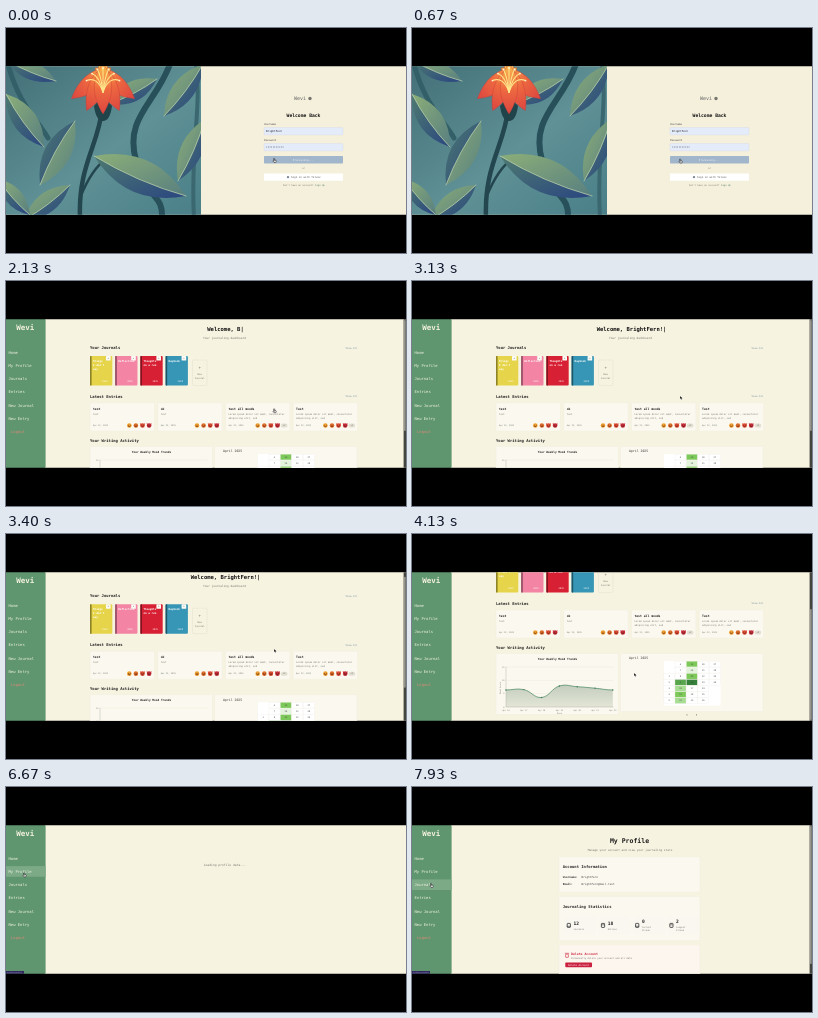
An HTML page for the animation above (8000 ms loop, 400 by 225 pixels).

```html
<!DOCTYPE html>
<html lang="en">
<head>
<meta charset="utf-8">
<title>Journal app tour</title>
<style>
  html, body { margin: 0; width: 100%; height: 100%; overflow: hidden; background: #000; }
  svg { display: block; width: 100%; height: 100%; }
  text { font-family: "DejaVu Sans Mono", "Noto Sans Mono", monospace; text-rendering: geometricPrecision; white-space: pre; }
</style>
</head>
<body>
<svg id="stage" viewBox="0 0 400 225">
  <defs>
    <clipPath id="view"><rect y="38.3" width="400" height="148.4"/></clipPath>
    <clipPath id="art"><rect y="38" width="195" height="149"/></clipPath>
    <linearGradient id="teal" x1="0" y1="0" x2="1" y2="1">
      <stop offset="0" stop-color="#447078"/><stop offset=".55" stop-color="#5f9196"/><stop offset="1" stop-color="#4a7f88"/>
    </linearGradient>
    <linearGradient id="leafDark" x1="0" y1="0" x2="1" y2="1">
      <stop offset="0" stop-color="#4d7a70"/><stop offset="1" stop-color="#2b4680"/>
    </linearGradient>
    <linearGradient id="leafLight" x1="0" y1="0" x2="1" y2="1">
      <stop offset="0" stop-color="#8cae78"/><stop offset="1" stop-color="#587f80"/>
    </linearGradient>
    <linearGradient id="petal" x1="0" y1="0" x2="0" y2="1">
      <stop offset="0" stop-color="#fbc04f"/><stop offset=".5" stop-color="#ee6a40"/><stop offset="1" stop-color="#dc4540"/>
    </linearGradient>
    <linearGradient id="area" x1="0" y1="0" x2="0" y2="1">
      <stop offset="0" stop-color="#c4cebe"/><stop offset="1" stop-color="#e3e5d6"/>
    </linearGradient>
  </defs>
</svg>
<script>
const LOOP = 8000;
const INK = '#222', GREY = '#77766e', CREAM = '#f7f3e1', GREEN = '#5f966f';
const APP = 'Wevi', USER = 'BrightFern';
const NS = 'http://www.w3.org/2000/svg';
const stage = document.getElementById('stage');

function el(parent, tag, attrs) {
  const node = document.createElementNS(NS, tag);
  for (const k in attrs) node.setAttribute(k, attrs[k]);
  return parent.appendChild(node);
}
const group = (p, attrs) => el(p, 'g', attrs);
const box = (p, x, y, width, height, fill, more) => el(p, 'rect', { x, y, width, height, fill, ...more });
const dot = (p, cx, cy, r, fill) => el(p, 'circle', { cx, cy, r, fill });
const path = (p, d, fill, stroke = 'none', width = 1) =>
  el(p, 'path', { d, fill, stroke, 'stroke-width': width, 'stroke-linecap': 'round' });
// y is the middle of the line of text
function label(p, x, y, size, str, fill = INK, more) {
  const node = el(p, 'text', { x, y: y + size * 0.35, 'font-size': size, fill, ...more });
  node.textContent = str;
  return node;
}
const BOLD = { 'font-weight': 700 };
const MID = { 'text-anchor': 'middle' };
const card = (p, x, y, w, h, fill = '#fbf9ef') =>
  box(p, x, y, w, h, fill, { rx: 1, stroke: '#efebdb', 'stroke-width': 0.4 });
const show = (node, on) => node.setAttribute('visibility', on ? 'inherit' : 'hidden');

const screen = group(stage, { 'clip-path': 'url(#view)' });

// Login
function leaf(p, x1, y1, x2, y2, bulge) {
  const mx = (x1 + x2) / 2, my = (y1 + y2) / 2, len = Math.hypot(x2 - x1, y2 - y1);
  const nx = (y1 - y2) / len * bulge, ny = (x2 - x1) / len * bulge;
  const vein = `Q${mx + nx * 0.2} ${my + ny * 0.2} ${x1} ${y1}`;
  for (const [s, fill] of [[1, 'url(#leafDark)'], [-1, 'url(#leafLight)']])
    path(p, `M${x1} ${y1}Q${mx + nx * s} ${my + ny * s} ${x2} ${y2}${vein}`, fill);
  path(p, `M${x2} ${y2}${vein}`, 'none', '#c3d6b0', 0.7);
}

function buildArt(p) {
  const art = group(p, { 'clip-path': 'url(#art)' });
  box(art, 0, 38, 195, 149, 'url(#teal)');
  const stem = (d, w, color = '#24474f') => path(art, d, 'none', color, w);
  stem('M164 36C150 75 118 90 130 132S157 165 156 190', 6, '#27505a');
  stem('M2 36C12 75 30 90 42 110', 5, '#335f68');
  stem('M190 36C196 80 184 120 188 190', 4, '#3a6770');
  stem('M96 82C92 118 72 138 74 190', 4.5);
  stem('M74 170C82 150 90 138 103 128', 2.5);
  leaf(art, 0, 32, 50, 53, 18);
  leaf(art, 0, 66, 38, 119, 24);
  leaf(art, 69, 93, 34, 157, 26);
  leaf(art, 103, 76, 151, 51, 20);
  leaf(art, 88, 128, 180, 168, 34);
  leaf(art, 158, 88, 197, 36, 22);
  leaf(art, 172, 153, 199, 91, 22);
  leaf(art, 18, 192, 64, 157, 20);
  leaf(art, -8, 151, 24, 187, 17);
  path(art, 'M88 78Q90 93 97 93T106 78L97 68Z', '#21434a');
  for (const a of [-52, 52, -24, 24, 0])
    el(art, 'path', {
      d: 'M97 36C84 52 87 70 97 86C107 70 110 52 97 36', fill: 'url(#petal)',
      stroke: '#c93b38', 'stroke-width': 0.4, transform: `rotate(${a} 97 46)`
    });
  for (let i = -3; i <= 3; i++) {
    const x = 97 + i * 5.5, y = 40 + i * i * 1.4;
    path(art, `M97 64Q${97 + i * 2} 48 ${x} ${y}`, 'none', '#ffe68a', 1.1);
    dot(art, x, y, 0.9, '#fff3cd');
  }
}

function buildLogin(p) {
  box(p, 0, 38, 400, 149, '#f5f0dc');
  buildArt(p);
  label(p, 288, 70.5, 5, APP, '#666');
  dot(p, 304, 70.5, 1.7, '#77776f');
  label(p, 297.5, 87, 4.7, 'Welcome Back', '#111', { ...BOLD, ...MID });
  const field = (y, name, value) => {
    label(p, 258, y, 2.5, name, '#444');
    box(p, 258, y + 3.5, 79, 7.4, '#e4ebf9', { rx: 0.8, stroke: '#d6dae4', 'stroke-width': 0.4 });
    label(p, 260, y + 7.2, 2.7, value, '#222');
  };
  field(96, 'Username', USER);
  field(112, 'Password', '•'.repeat(11));
  box(p, 258, 128, 79, 7.5, '#a1b5cb', { rx: 0.8 });
  label(p, 297, 131.8, 2.6, 'Processing...', '#f4f6f8', MID);
  label(p, 297.5, 140.5, 2.4, 'or', GREY, MID);
  box(p, 258, 145.5, 79, 7.2, '#fff', { rx: 0.8 });
  dot(p, 282, 149.1, 1.2, '#7d8795');
  label(p, 285, 149.1, 2.6, 'Sign in with Tolvex', '#555');
  label(p, 277, 157.5, 2.3, "Don't have an account?", GREY);
  label(p, 309, 157.5, 2.3, 'Sign Up', '#4d7d69');
}

// Dashboard
const WELCOME = `Welcome, ${USER}!`;
const SCROLL = 46;
let welcome, calendar, pager, chart, page, thumb;

function heading(p, y, str) {
  label(p, 84, y, 3.87, str, '#1c1c1c', BOLD);
}

function scrollbar(p, y, height) {
  box(p, 397.6, 38, 2.4, 149, '#45453f');
  return box(p, 398, y, 1.7, height, '#96968f', { rx: 0.8 });
}

function buildJournals(p) {
  const books = [
    ['#e6d54b', '#8d8226', 'Things|I don\'t|say'],
    ['#f384a4', '#8f4a60', 'Reflection'],
    ['#d82034', '#7c1422', 'Thoughts|on a run'],
    ['#3796b5', '#1d5468', 'Daybook']
  ];
  books.forEach(([color, spine, title], i) => {
    const x = 84 + i * 25.2;
    box(p, x, 75, 22.3, 29.6, color, { rx: 1 });
    box(p, x, 75, 1.6, 29.6, spine, { rx: 0.6 });
    box(p, x + 16, 75, 4.6, 4.6, '#fbfaf4', { rx: 0.5 });
    dot(p, x + 18.3, 77.2, 0.5, '#999');
    title.split('|').forEach((line, n) => label(p, x + 3, 80 + n * 4, 2.7, line, '#fff', BOLD));
    label(p, x + 12, 99.8, 2.3, '2025', '#fff');
  });
  box(p, 186.5, 79, 14.5, 25.5, 'none', { rx: 1, stroke: '#cfccbd', 'stroke-width': 0.4, 'stroke-dasharray': '1 .7' });
  label(p, 193.7, 86.5, 4, '+', GREY, MID);
  label(p, 193.7, 93, 2.3, 'New', GREY, MID);
  label(p, 193.7, 97, 2.3, 'Journal', GREY, MID);
}

function mood(p, x, y, color, horn) {
  if (horn) path(p, `M${x - 2.4} ${y - 2.6}L${x - 0.4} ${y - 1}H${x + 0.6}L${x + 2.4} ${y - 2.6}L${x + 2} ${y}H${x - 2}Z`, color);
  dot(p, x, y, 2.3, color);
  for (const s of [-0.9, 0.9]) dot(p, x + s, y - 0.4, 0.45, '#4a1d12');
  path(p, `M${x - 0.9} ${y + 0.9}Q${x} ${y + 1.6} ${x + 0.9} ${y + 0.9}`, '#5a2012', '#5a2012', 0.5);
}

function buildEntries(p) {
  const lorem = 'Lorem ipsum dolor sit amet, consectetur|adipiscing elit, sed';
  [['test', 'test'], ['ok', 'test'], ['test all moods', lorem], ['Test', lorem]].forEach(([title, body], i) => {
    const x = 84 + i * 67.7, long = i > 1;
    card(p, x, 122, 64.5, 28);
    label(p, x + 3, 128, 3.1, title, '#1c1c1c', BOLD);
    body.split('|').forEach((line, n) => label(p, x + 3, 133.2 + n * 3.9, 2.4, line, GREY));
    label(p, x + 3, 144.6, 2.1, 'Apr 22, 2025', GREY);
    ['#f0a030', '#e0702c', '#dc4a32', '#c52c3a'].forEach((c, n) =>
      mood(p, x + (long ? 32.3 : 39.3) + n * 6.6, 144.5, c, n > 1));
    if (long) {
      box(p, x + 55.5, 142.5, 6.5, 4, '#e3e0d3', { rx: 1.5 });
      label(p, x + 58.7, 144.5, 2.3, '+2', GREY, MID);
    }
  });
}

function buildChart(p) {
  card(p, 84, 165.5, 122.5, 61);
  label(p, 145.5, 171.2, 2.85, 'Your Weekly Mood Trends', '#222', { ...BOLD, ...MID });
  chart = group(p);
  const step = 17.8, left = 94, base = 219;
  for (let i = 0; i < 4; i++) {
    const y = 179 + i * 13.3;
    path(chart, `M${left} ${y}H201`, 'none', '#e6e3d6', 0.35);
    label(chart, 92.5, y, 2, String(15 - i * 5), GREY, { 'text-anchor': 'end' });
  }
  const ys = [202, 201.6, 209.5, 198, 198.7, 200.2, 202];
  let line = `M${left} ${ys[0]}`;
  for (let i = 1; i < ys.length; i++) {
    const x = left + i * step, h = step * 0.42;
    const slope = k => k > 0 && k < 6 ? (ys[k + 1] - ys[k - 1]) * 0.2 : 0;
    line += `C${x - step + h} ${ys[i - 1] + slope(i - 1)} ${x - h} ${ys[i] - slope(i)} ${x} ${ys[i]}`;
  }
  path(chart, `${line}V${base}H${left}Z`, 'url(#area)');
  path(chart, line, 'none', '#4f8a68', 0.75);
  path(chart, `M${left} 179V${base}H201`, 'none', '#aaa99d', 0.4);
  ys.forEach((y, i) => {
    const x = left + i * step;
    dot(chart, x, y, 0.7, '#3f7c59');
    label(chart, x, 222.5, 2, `Apr ${16 + i}`, GREY, MID);
  });
  label(chart, 147.5, 225.4, 2, 'Date', GREY, MID);
  label(chart, 88, 200, 2, 'Mood Score', GREY, { ...MID, transform: 'rotate(-90 88 200)' });
}

function buildCalendar(p) {
  card(p, 208.5, 165.5, 142.5, 58);
  label(p, 217, 170.3, 3.2, 'April 2025', '#333');
  calendar = group(p);
  box(calendar, 252, 173, 56.5, 44.5, '#fff');
  const shade = { 13: '#7cc95a', 14: '#e4f4dc', 15: '#7cc95a', 16: '#35803a', 9: '#57a54c', 10: '#a6dd92', 11: '#7cc95a', 12: '#a6dd92' };
  for (let col = 0; col < 5; col++)
    for (let row = 0; row < 7; row++) {
      const day = col * 7 + row - 1, x = 251.6 + col * 11.4, y = 173.2 + row * 6.1;
      if (day < 1 || day > 30) continue;
      box(calendar, x, y, 11, 5.7, shade[day] || '#fff', { stroke: '#eeece4', 'stroke-width': 0.3 });
      label(calendar, x + 5.5, y + 2.9, 2.2, String(day), '#444', MID);
    }
  pager = group(p);
  label(pager, 275, 227, 4, '‹', INK, MID);
  label(pager, 284.5, 227, 4, '›', INK, MID);
}

function buildDashboard(p) {
  box(p, 39, 38, 361, 149, CREAM);
  page = group(p);
  welcome = label(page, 219.5, 48.3, 5.53, '', '#111', { ...BOLD, ...MID });
  label(page, 218.5, 57.2, 2.85, 'Your journaling dashboard', GREY, MID);
  heading(page, 67, 'Your Journals');
  heading(page, 115.5, 'Latest Entries');
  heading(page, 159.5, 'Your Writing Activity');
  for (const y of [67, 115.5]) label(page, 339.5, y, 2.5, 'View All', '#7a94a0');
  buildJournals(page);
  buildEntries(page);
  buildChart(page);
  buildCalendar(page);
  thumb = scrollbar(p, 39, 111);
}

// Profile
function buildProfile(p) {
  label(p, 217.5, 54, 6.5, 'My Profile', '#1c1c1c', { ...BOLD, ...MID });
  label(p, 218, 63.2, 2.82, 'Manage your account and view your journaling stats', GREY, MID);
  const title = (y, str) => label(p, 150.7, y, 3.87, str, '#222', BOLD);
  card(p, 147, 70, 141, 35);
  title(79.7, 'Account Information');
  [['Username:', USER], ['Email:', `${USER}@mail.test`]].forEach(([k, v], i) => {
    label(p, 150.7, 90 + i * 6.6, 2.75, k, '#333', BOLD);
    label(p, 169.5, 90 + i * 6.6, 2.75, v, '#444');
  });
  card(p, 147, 109.5, 141, 44);
  title(120, 'Journaling Statistics');
  [['12', 'Journals'], ['18', 'Entries'], ['0', 'Current|Streak'], ['2', 'Longest|Streak']].forEach(([n, name], i) => {
    const x = 156.7 + i * 34.2;
    box(p, x - 3.5, 129.5, 31, 18, '#f9f7f0', { rx: 1 });
    box(p, x - 1.5, 136.4, 3.2, 4, 'none', { rx: 0.5, stroke: '#333', 'stroke-width': 0.8 });
    path(p, i % 2 ? `M${x - 0.7} 137.8H${x + 0.9}` : `M${x - 1.4} 139.3H${x + 1.6}`, 'none', '#333', 0.6);
    label(p, x + 4.8, name.includes('|') ? 134.8 : 136.3, 4.6, n, '#222', BOLD);
    name.split('|').forEach((s, k, all) =>
      label(p, x + 4.8, (all.length > 1 ? 140.3 : 142) + k * 3.1, 2.2, s, GREY));
  });
  card(p, 147, 158, 141, 40, '#fcf6ef');
  box(p, 153.6, 167.2, 2.8, 3.2, 'none', { rx: 0.4, stroke: '#cf2a40', 'stroke-width': 0.6 });
  path(p, 'M153.2 166.3H156.8', 'none', '#cf2a40', 0.6);
  label(p, 159, 166.8, 3.2, 'Delete Account', '#cf2a40', BOLD);
  label(p, 159, 171.5, 2.3, 'Permanently delete your account and all data', GREY);
  box(p, 153.3, 175.4, 26.7, 4.8, '#cb2140', { rx: 0.8 });
  label(p, 166.6, 177.8, 2.5, 'Delete Account', '#fff', MID);
  scrollbar(p, 39, 138);
}

// Sidebar
const LINKS = ['Home', 'My Profile', 'Journals', 'Entries', 'New Journal', 'New Entry', 'Logout'];
const linkY = i => 71.2 + i * 13.25;
let hover, status, statusText;

function buildSidebar(p) {
  box(p, 0, 38, 39.6, 149, GREEN);
  hover = box(p, 0, 0, 39.6, 10.6, '#7caa87');
  label(p, 19.2, 46.8, 7.5, APP, '#f4f1df', { ...BOLD, ...MID });
  LINKS.forEach((name, i) => {
    const last = i === 6;
    label(p, last ? 5 : 2.5, linkY(i), 3.85, name, last ? '#d98a78' : '#f3f2e4');
  });
  status = group(p);
  box(status, 0, 184, 18, 3, '#30275c');
  statusText = label(status, 0.7, 185.5, 1.5, '', '#b9b4e6');
}

const login = group(screen), app = group(screen);
buildLogin(login);
const dash = group(app), profile = group(app), loading = group(app);
buildDashboard(dash);
for (const p of [profile, loading]) box(p, 39, 38, 361, 149, CREAM);
buildProfile(profile);
label(loading, 218.8, 77.6, 3.05, 'Loading profile data...', GREY, MID);
buildSidebar(app);

const arrow = path(screen, 'M0 0L0 3.3L.9 2.6L1.5 3.7L2.1 3.4L1.6 2.4L2.6 2.3Z', '#111', '#fff', 0.25);
const hand = path(screen, 'M0 -1.6Q.6 -1.9 .7 -1.1V0L2 .4Q2.4 .7 2.2 1.4L1.8 2.4H0L-1.1 .9Q-1 .2 0 .8Z', '#fff', '#111', 0.55);

// Motion
const T = { enter: 1000, data: 1400, type: 1250, key: 85, load: 6470, ready: 6930 };
// time, x, y of the pointer
const POINTER = [
  [0, 268, 132], [1200, 268, 133], [1900, 268, 133], [2700, 268, 115], [3600, 268, 115],
  [4050, 222, 139], [4500, 222, 139], [5200, 42, 124], [5600, 17, 100], [5870, 17, 100],
  [6200, 18, 87.5], [7900, 18, 87.5], [7925, 19, 98], [LOOP, 19, 98]
];
const ease = k => k * k * (3 - 2 * k);
const ramp = (t, a, b) => ease(Math.min(1, Math.max(0, (t - a) / (b - a))));

function pointerAt(t) {
  const i = POINTER.findIndex(k => t < k[0]);
  const [a, x1, y1] = POINTER[i - 1], [b, x2, y2] = POINTER[i];
  const k = ramp(t, a, b);
  return [x1 + (x2 - x1) * k, y1 + (y2 - y1) * k];
}

function draw(now) {
  const t = now % LOOP;
  const inApp = t >= T.enter, onProfile = t >= T.load;
  show(login, !inApp);
  show(app, inApp);
  show(dash, inApp && !onProfile);
  show(loading, onProfile && t < T.ready);
  show(profile, t >= T.ready);

  const typed = Math.max(0, Math.floor((t - T.type) / T.key));
  const blink = t > 3300 && t % 1000 > 500;
  welcome.textContent = WELCOME.slice(0, typed) + (blink ? ' ' : '|');
  const full = t >= T.data;
  show(chart, full);
  show(calendar, full);
  pager.setAttribute('transform', `translate(0 ${full ? 0 : -41})`);
  const s = ramp(t, 3300, 3800);
  page.setAttribute('transform', `translate(0 ${-SCROLL * s})`);
  thumb.setAttribute('y', 39 + 36 * s);

  const [x, y] = pointerAt(t);
  const link = inApp && x < 40 ? Math.round((y - linkY(0)) / 13.25) : -1;
  show(hover, link >= 0);
  show(status, link >= 0);
  if (link >= 0) {
    hover.setAttribute('y', linkY(link) - 5.3);
    statusText.textContent = 'localhost/' + LINKS[link].split(' ').pop().toLowerCase();
  }
  const pointing = link >= 0 || t < 2250;
  show(hand, pointing);
  show(arrow, !pointing);
  for (const c of [hand, arrow]) c.setAttribute('transform', `translate(${x} ${y})`);
}

const start = performance.now();
function tick() {
  draw(Math.max(0, performance.now() - start));
  requestAnimationFrame(tick);
}
tick();
</script>
</body>
</html>
```
